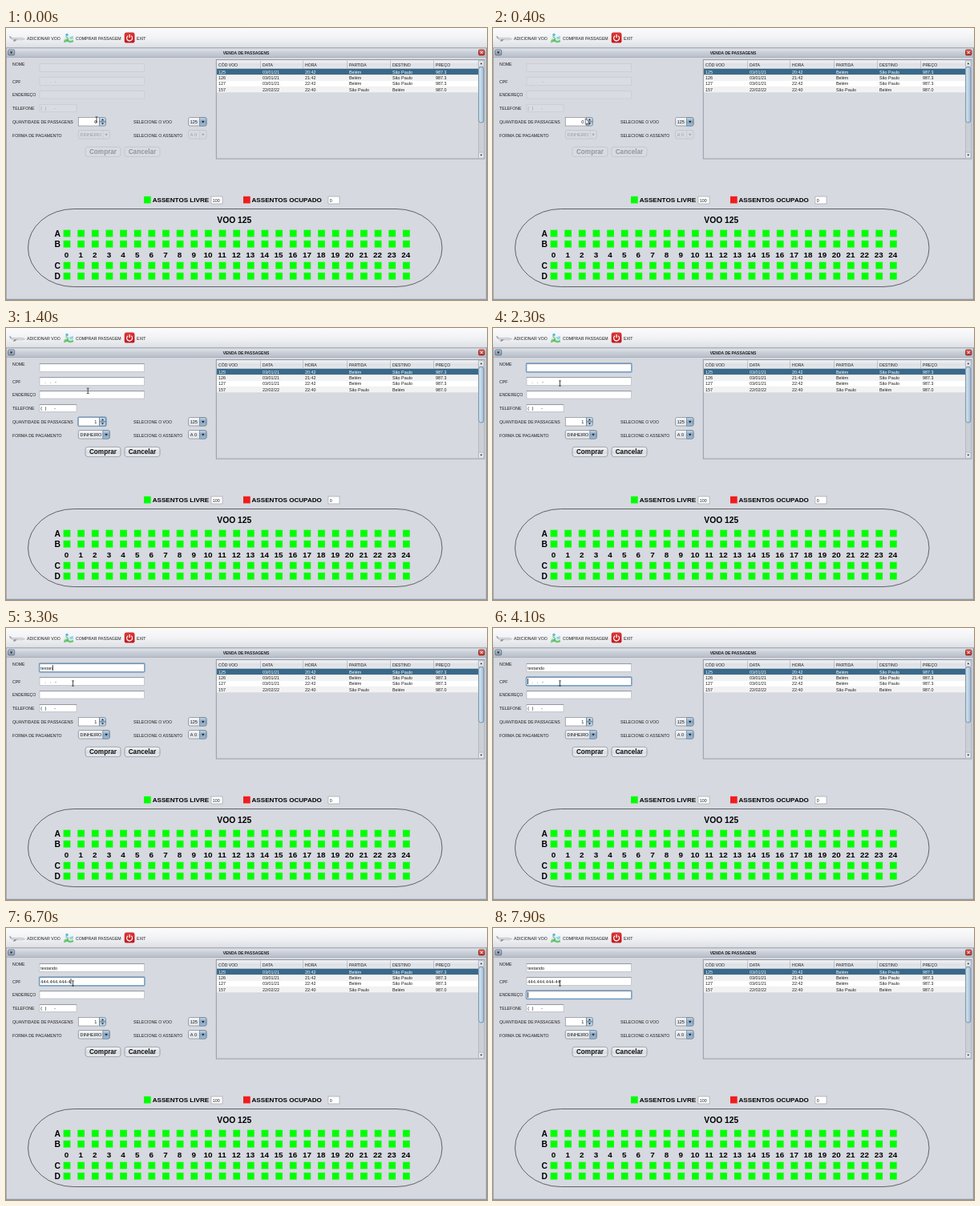
These frames come from a looping animation (600x339 px, 8000 ms). An HTML page with a canvas:

```html
<!DOCTYPE html>
<html lang="pt">
<head>
<meta charset="utf-8">
<title>Venda de passagens</title>
<style>
html, body { margin: 0; width: 100%; height: 100%; overflow: hidden; background: #d6d9df; }
canvas { display: block; width: 600px; height: 339px; }
</style>
</head>
<body>
<canvas id="stage" width="600" height="339"></canvas>
<script>
const ctx = document.getElementById('stage').getContext('2d');
const LOOP = 8000;
const BG = '#d6d9df', INK = '#1c1c1e', FADED = '#9b9da3';
const T = { enable: 1000, name: 1800, type: 2700, cpf: 3800, digits: 5200, address: 7450 };

function rect(x, y, w, h, fill) {
  ctx.fillStyle = fill;
  ctx.fillRect(x, y, w, h);
}

function shade(y, h, ...colors) {
  const g = ctx.createLinearGradient(0, y, 0, y + h);
  colors.forEach((c, i) => g.addColorStop(i / (colors.length - 1), c));
  return g;
}

function round(x, y, w, h, r, fill, stroke, line = 0.7) {
  ctx.beginPath();
  ctx.roundRect(x, y, w, h, r);
  if (fill) { ctx.fillStyle = fill; ctx.fill(); }
  if (stroke) { ctx.strokeStyle = stroke; ctx.lineWidth = line; ctx.stroke(); }
}

function poly(points, fill, stroke, line = 0.6) {
  ctx.beginPath();
  points.forEach(([x, y]) => ctx.lineTo(x, y));
  ctx.closePath();
  if (fill) { ctx.fillStyle = fill; ctx.fill(); }
  if (stroke) { ctx.strokeStyle = stroke; ctx.lineWidth = line; ctx.stroke(); }
}

function path(points, stroke, line) {
  ctx.beginPath();
  points.forEach(([x, y]) => ctx.lineTo(x, y));
  ctx.strokeStyle = stroke;
  ctx.lineWidth = line;
  ctx.stroke();
}

function disc(x, y, r, fill) {
  ctx.beginPath();
  ctx.arc(x, y, r, 0, Math.PI * 2);
  ctx.fillStyle = fill;
  ctx.fill();
}

function font(size, bold = false) {
  ctx.font = `${bold ? 'bold ' : ''}${size}px "Liberation Sans", Arial, sans-serif`;
}

function text(s, x, y, size, { color = INK, bold = false, align = 'left' } = {}) {
  font(size, bold);
  ctx.textAlign = align;
  ctx.fillStyle = color;
  ctx.fillText(s, x, y);
}

function arrow(x, y, dir, color = '#222', r = 1.7) {
  poly([[x - r, y - dir * r * 0.6], [x + r, y - dir * r * 0.6], [x, y + dir * r]], color);
}

function toolbar() {
  rect(0, 0, 600, 25, shade(0, 25, '#fbfbfc', '#f1f2f4', '#dcdfe4'));
  // plane
  poly([[5, 12.5], [20, 12.3], [23.5, 13.6], [21, 14.8], [8, 14.6]], '#d9dbde', '#9a9ea4', 0.4);
  poly([[10, 14.2], [14, 14.2], [11, 16.8], [9, 16.8]], '#8d9299');
  poly([[4, 10], [5.4, 10], [7.5, 12.8], [5, 12.8]], '#a5a9af');
  // traveller on a map
  poly([[73, 12], [77, 10], [81, 12], [84, 10], [84, 17.5], [80, 18.5], [76, 17], [72, 18.5]], '#d3eee0');
  poly([[72.5, 15], [76, 13.5], [80, 16], [84, 15], [84, 17.5], [80, 18.5], [76, 17], [72, 18.5]], '#72c774');
  poly([[79, 11.5], [84, 10], [83.5, 13.5], [80.5, 14]], '#8fd0ea');
  disc(76, 8.5, 1.7, '#5fb4d4');
  path([[74.5, 10.5], [77.5, 13], [76, 16.5]], '#4ba37a', 1);
  text('COMPRAR PASSAGEM', 87, 15, 5.2);
  text('ADICIONAR VOO', 26, 15, 5.2);
  // power button
  round(147.7, 5.6, 12.8, 13, 2.6, shade(5, 14, '#dc3a3a', '#c0161b'));
  ctx.beginPath();
  ctx.arc(154.1, 12.6, 3.4, -0.95, Math.PI + 0.95);
  ctx.strokeStyle = '#fff';
  ctx.lineWidth = 1.3;
  ctx.stroke();
  path([[154.1, 8], [154.1, 12.2]], '#fff', 1.3);
  text('EXIT', 163, 15, 5.2);
}

function windowFrame() {
  rect(0, 25, 600, 314, BG);
  rect(0, 24.5, 600, 1, '#7d8591');
  rect(0, 25.5, 600, 10.5, shade(25, 11, '#e3e6eb', '#c9ced7', '#b9c0cb'));
  rect(0, 36, 600, 0.8, '#a0a7b3');
  rect(0, 25, 0.8, 314, '#9aa1ad');
  rect(598.8, 25, 1.2, 314, '#8c95a2');
  rect(0, 337.7, 600, 1.3, '#8c95a2');
  round(2.5, 27, 8.2, 7, 1.5, shade(27, 7, '#b4c1d0', '#8494a8'), '#566578');
  arrow(6.6, 30.4, 1);
  round(589.5, 27, 7.5, 7, 1.5, shade(27, 7, '#e06a60', '#b52a22'), '#802019');
  path([[591.6, 28.9], [594.9, 32.2]], '#fff', 1);
  path([[594.9, 28.9], [591.6, 32.2]], '#fff', 1);
  text('VENDA DE PASSAGENS', 299.5, 33, 4.95, { bold: true, align: 'center' });
}

function field(x, y, w, h, value, on, focus) {
  if (focus) round(x - 0.4, y - 0.4, w + 0.8, h + 0.8, 1, null, '#73a4d1', 1.6);
  rect(x, y, w, h, on ? '#fff' : '#d9dce2');
  ctx.strokeStyle = on ? (focus ? '#6d8fb0' : '#b4b9c2') : '#c6cad2';
  ctx.lineWidth = 0.7;
  ctx.strokeRect(x, y, w, h);
  if (on) rect(x, y - 0.2, w, 0.8, '#868c96');
  text(value, x + 1.3, y + h / 2 + 2.1, 5.8, { color: on ? INK : FADED });
}

function caretAfter(s, x, y, size) {
  font(size);
  rect(x + ctx.measureText(s).width, y, 0.8, 7, '#111');
}

function combo(x, y, w, value, on) {
  const cap = 8.5;
  const fill = on ? shade(y, 11, '#f8f9fa', '#dfe3e8', '#eceef1') : '#d7dae0';
  round(x, y, w, 10.5, 2, fill, on ? '#7c8592' : '#bbc0c8');
  if (on) {
    round(x + w - cap, y, cap, 10.5, [0, 2, 2, 0], shade(y, 11, '#c8d6e4', '#86a5c1', '#a9c3da'), '#5f7a94');
  } else {
    rect(x + w - cap, y + 0.5, 0.6, 9.5, '#c0c5cd');
  }
  arrow(x + w - cap / 2, y + 5.2, 1, on ? '#16202b' : '#a2a6ad');
  text(value, x + 2.2, y + 7.4, 5.5, { color: on ? INK : FADED });
}

function spinner(value, focus, hot) {
  const y = 111.5;
  if (focus) round(89.8, y - 0.4, 35.2, 11.2, 2, null, '#73a4d1', 1.6);
  rect(90.3, y, 26, 10.5, '#fff');
  ctx.strokeStyle = '#868c96';
  ctx.lineWidth = 0.7;
  ctx.strokeRect(90.3, y, 26, 10.5);
  const top = hot ? ['#9fc0dd', '#5f8fb8'] : ['#d5e0ea', '#a4bdd3'];
  round(116.5, y, 8, 5.2, [0, 2, 0, 0], shade(y, 5, ...top), '#5f7a94');
  round(116.5, y + 5.3, 8, 5.2, [0, 0, 2, 0], shade(y + 5, 5, '#a9c1d6', '#c6d7e6'), '#5f7a94');
  arrow(120.5, y + 2.8, -1, '#222', 1.4);
  arrow(120.5, y + 7.6, 1, '#222', 1.4);
  text(value, 113.3, 119.2, 5.6, { align: 'right' });
}

function button(x, label, on) {
  const fill = on ? shade(148, 12, '#fbfbfc', '#e3e6ea', '#d9dde3', '#f1f3f5') : '#d8dbe1';
  round(x, 148.3, 44, 12, 3, fill, on ? '#7f8792' : '#bcc1c9');
  text(label, x + 22, 157.2, 8.2, { bold: true, align: 'center', color: on ? '#111' : '#94969b' });
}

// digits come in groups of three
function digitCount(t) {
  const d = t - T.digits;
  if (d < 0) return 0;
  return Math.min(11, 3 * Math.floor(d / 500) + Math.min(3, Math.floor(d % 500 / 130) + 1));
}

function form(t) {
  const on = t >= T.enable;
  const letters = t < T.type ? 0 : Math.floor((t - T.type) / 110) + 1;
  const name = 'testando'.slice(0, letters);
  const digits = digitCount(t);
  let n = 0;
  const cpf = '###.###.###-##'.replace(/#/g, () => n++ < digits ? '4' : ' ');
  const focus = t < T.name ? 'qty' : t < T.cpf ? 'name' : t < T.address ? 'cpf' : 'address';

  const labels = [['NOME', 47], ['CPF', 69], ['ENDEREÇO', 85], ['TELEFONE', 102],
    ['QUANTIDADE DE PASSAGENS', 119], ['FORMA DE PAGAMENTO', 136]];
  labels.forEach(([s, y]) => text(s, 8, y, 5.2));
  text('SELECIONE O VOO', 159, 119, 5.2);
  text('SELECIONE O ASSENTO', 159, 136, 5.2);

  field(42, 44.5, 130.5, 10, '', on, focus === 'name');
  text(name, 43.3, 51.6, 5.4);
  field(42, 61.5, 130.5, 10, cpf, on, focus === 'cpf');
  field(42, 78.5, 130.5, 9.5, '', on, focus === 'address');
  field(42, 95.3, 46, 9, '(  )      -', on, false);

  spinner(on ? '1' : '0', focus === 'qty' && t >= 700, t > 700 && t < 1150);
  combo(227.5, 111.5, 22.5, '125', true);
  combo(90.3, 127.5, 39, 'DINHEIRO', on);
  combo(227.5, 127.5, 22.5, 'A 0', on);
  button(99, 'Comprar', on);
  button(148, 'Cancelar', on);

  const lit = since => (t - since) % 1000 < 500;
  if (focus === 'qty' && t >= 700 && !on) caretAfter('', 109.6, 113.4, 5.6);
  if (focus === 'name' && (letters || lit(T.name))) caretAfter(name, 43.2, 46.2, 5.4);
  if (focus === 'cpf' && (digits || lit(T.cpf))) {
    const dots = Math.floor(Math.max(0, digits - 1) / 3);
    caretAfter(cpf.slice(0, digits + dots), 43.2, 63.1, 5.8);
  }
  if (focus === 'address' && lit(T.address)) caretAfter('', 43.3, 79.8, 5.8);
}

function table() {
  const cols = [265, 320, 373, 428, 482, 536];
  const heads = ['CÓD VOO', 'DATA', 'HORA', 'PARTIDA', 'DESTINO', 'PREÇO'];
  const rows = [
    ['125', '03/01/21', '20:42', 'Belém', 'São Paulo', '987.3'],
    ['126', '03/01/21', '21:42', 'Belém', 'São Paulo', '987.3'],
    ['127', '03/01/21', '22:42', 'Belém', 'São Paulo', '987.3'],
    ['157', '22/02/22', '22:40', 'São Paulo', 'Belém', '987.0']
  ];
  ctx.strokeStyle = '#8f96a1';
  ctx.lineWidth = 0.9;
  ctx.strokeRect(262.3, 39.5, 334.5, 123.5);
  rect(263, 40.5, 326, 10.3, shade(40, 11, '#f4f5f7', '#dde0e5', '#e8eaee'));
  rect(263, 50.4, 326, 0.6, '#9da3ad');
  heads.forEach((s, i) => {
    text(s, cols[i], 48.2, 5.1);
    if (i) rect(cols[i] - 2.8, 40.5, 0.6, 10, '#a6acb6');
  });
  rows.forEach((row, r) => {
    const y = 51 + r * 7.3;
    rect(263, y, 326, 7.3, r ? (r % 2 ? '#f2f2f2' : '#fff') : '#39698a');
    row.forEach((s, i) => text(s, cols[i], y + 5.7, 5.4, { color: r ? INK : '#fff' }));
  });
  rect(589, 40.5, 7.4, 122, '#cbd0d7');
  rect(589, 40.5, 0.6, 122, '#a7adb7');
  round(589.4, 40.8, 6.7, 7.2, 1, '#e6e9ed', '#a2a9b4');
  arrow(592.8, 44.5, -1, '#333', 1.4);
  const g = ctx.createLinearGradient(589, 0, 597, 0);
  ['#e3ecf4', '#bdd1e2', '#9dbad2'].forEach((c, i) => g.addColorStop(i / 2, c));
  round(589.7, 48.5, 6.2, 69.5, 3, g, '#55799a');
  round(589.4, 155, 6.7, 7.2, 1, '#e6e9ed', '#a2a9b4');
  arrow(592.8, 158.4, 1, '#333', 1.4);
}

function seats() {
  const size = 8.7, pitch = 17.64, first = 76;
  const black = { bold: true, color: '#000' };
  const centered = { ...black, align: 'center' };
  const legend = [[172, '#00ff00', 'ASSENTOS LIVRE', 182.7, 256, '100'],
    [296, '#f01c1c', 'ASSENTOS OCUPADO', 306.5, 402, '0']];
  legend.forEach(([x, color, label, lx, fx, value]) => {
    rect(x, 209.8, size, size, color);
    text(label, lx, 217.2, 8.1, black);
    rect(fx, 210, 14, 9, '#fff');
    ctx.strokeStyle = '#a0a6b0';
    ctx.lineWidth = 0.7;
    ctx.strokeRect(fx, 210, 14, 9);
    text(value, fx + 1.8, 216.6, 5.3);
  });

  ctx.beginPath();
  ctx.roundRect(27.5, 225.5, 516.5, 97, { x: 57, y: 48.5 });
  ctx.strokeStyle = '#222';
  ctx.lineWidth = 0.65;
  ctx.stroke();
  text('VOO 125', 284.8, 242.8, 10.3, centered);

  [256, 269.2, 296, 309.2].forEach((y, r) => {
    text('ABCD'[r], 64.2, y + 3.7, 10.3, centered);
    for (let i = 0; i < 25; i++) rect(first + i * pitch - size / 2, y - size / 2, size, size, '#00ff00');
  });
  for (let i = 0; i < 25; i++) text(i, first - 0.5 + i * pitch, 286.1, 9.9, centered);
}

// time, x, y
const track = [[0, 113, 114], [150, 113, 114], [750, 121, 116], [1100, 121, 116],
  [1650, 88, 50], [1850, 88, 50], [2100, 83.5, 69], [LOOP, 83.5, 69]];

function pointer(t) {
  const i = track.findIndex(k => t < k[0]);
  const [t0, x0, y0] = track[i - 1], [t1, x1, y1] = track[i];
  const p = (t - t0) / (t1 - t0), e = p * p * (3 - 2 * p);
  const x = x0 + (x1 - x0) * e, y = y0 + (y1 - y0) * e;
  const overField = x < 116 && (y > 111 || y < 105) && !(y > 55 && y < 61);
  if (overField) {
    path([[x, y - 3], [x, y + 3]], '#222', 0.8);
    path([[x - 1.5, y - 3.2], [x + 1.5, y - 3.2]], '#222', 0.7);
    path([[x - 1.5, y + 3.2], [x + 1.5, y + 3.2]], '#222', 0.7);
  } else {
    const shape = [[0, 0], [0, 7.5], [1.8, 5.9], [3, 8.5], [4.1, 8], [3, 5.5], [5.2, 5.4]];
    poly(shape.map(([a, b]) => [x - 0.8 + a, y - 2 + b]), '#fff', '#222', 0.6);
  }
}

function draw(t) {
  toolbar();
  windowFrame();
  form(t);
  table();
  seats();
  pointer(t);
}

const start = performance.now();
function frame() {
  draw((performance.now() - start) % LOOP);
  requestAnimationFrame(frame);
}
frame();
</script>
</body>
</html>
```
